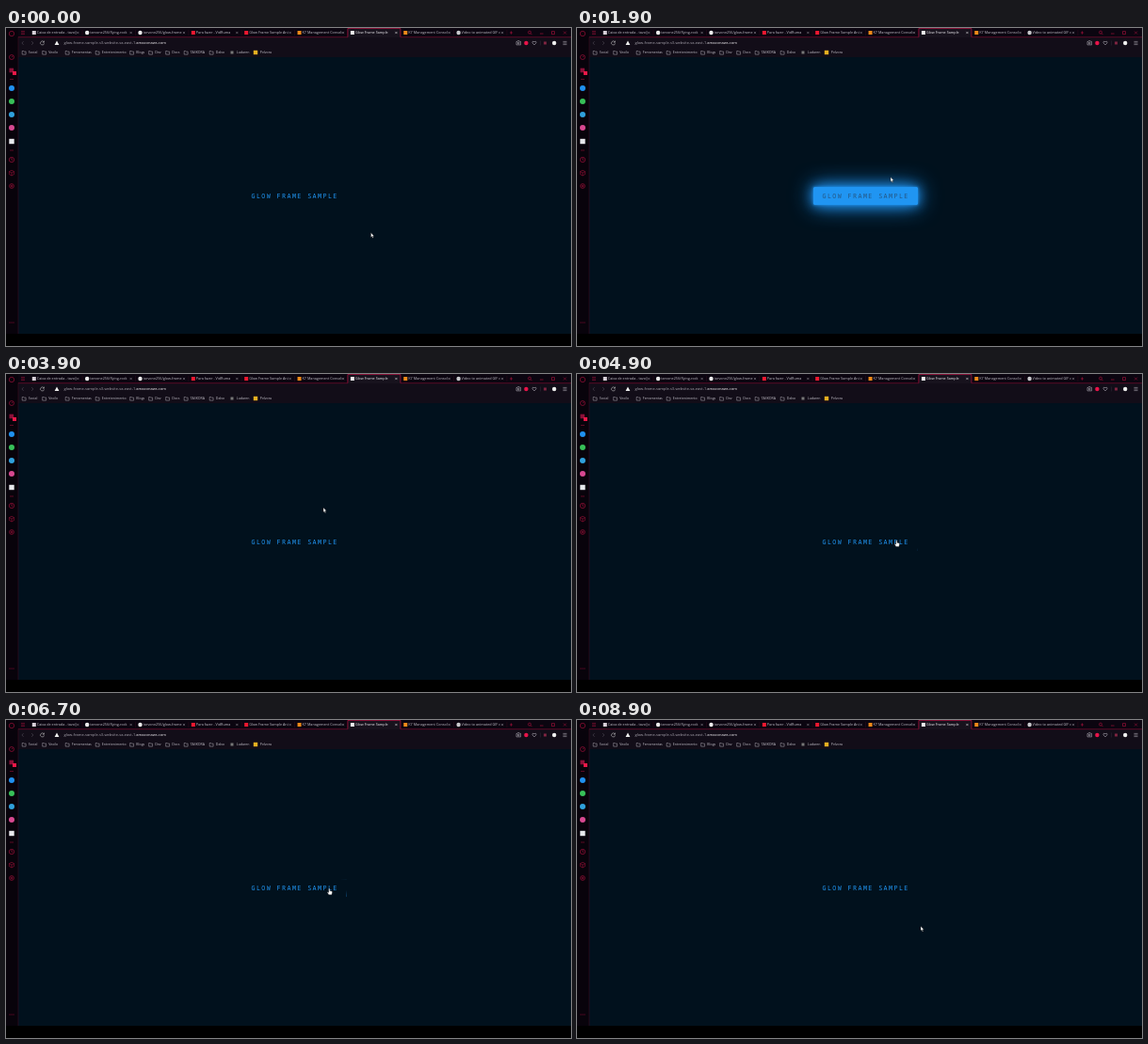
An HTML page that plays this animation: 600 by 338 pixels, repeating every 9100 ms.

```html
<!DOCTYPE html>
<html lang="pt">
<head>
<meta charset="utf-8">
<title>Glow Frame Sample</title>
<style>
  html, body { margin: 0; width: 100%; height: 100%; overflow: hidden; background: #000; }
  svg { position: absolute; left: 0; top: 0; }
  svg svg { overflow: hidden; }
  text { font-family: "Open Sans", "Noto Sans", sans-serif; white-space: pre; }
  #button {
    position: absolute; left: 250.7px; top: 169px; width: 111.2px; height: 19.2px;
    box-sizing: border-box; padding-left: 9.8px; overflow: hidden; border-radius: 1px;
    font: 6.8px/19.6px "Noto Sans Mono", monospace; letter-spacing: 1.35px; white-space: pre;
  }
  #button i { position: absolute; }
  .flat { width: 100%; height: .7px; }
  .tall { width: .7px; height: 100%; }
</style>
</head>
<body>
<svg id="browser" width="600" height="338"></svg>
<div id="button">GLOW FRAME SAMPLE<i class="flat"></i><i class="tall"></i><i class="flat"></i><i class="tall"></i></div>
<svg width="600" height="338">
  <g id="cursor" stroke="#111" stroke-width=".35" fill="#fff">
    <path id="arrow" d="M0 0V4.9L1.1 3.9L1.9 5.7L2.7 5.3L1.9 3.6H3.4Z"/>
    <path id="hand" d="M-.6 .5Q0-.4 .6 .5V2.5L2.7 3Q3.4 3.2 3.2 4.2L2.6 6.8H-.5L-2 4.5Q-2.1 3.6-1.3 3.8L-.6 4.4Z"/>
  </g>
</svg>
<script>
const $ = id => document.getElementById(id);
const RED = '#b0123f', PALE = '#c4c1ca', BLUE = '#2196f3';

// ---- browser window ----
const rect = (x, y, w, h, fill) => `<rect x="${x}" y="${y}" width="${w}" height="${h}" fill="${fill}"/>`;
const dot = (x, y, r, fill) => `<circle cx="${x}" cy="${y}" r="${r}" fill="${fill}"/>`;
const box = (x, y, size, fill) => rect(x - size / 2, y - size / 2, size, size, fill);
const line = (d, color = RED, width = .6) =>
  `<path d="${d}" fill="none" stroke="${color}" stroke-width="${width}"/>`;
const ring = (x, y, r, color = RED) =>
  `<circle cx="${x}" cy="${y}" r="${r}" fill="none" stroke="${color}" stroke-width=".6"/>`;
const label = (x, y, size, words, fill = PALE) =>
  `<text x="${x}" y="${y}" font-size="${size}" fill="${fill}">${words}</text>`;
const cross = (x, y, r, color) =>
  line(`M${x - r} ${y - r}l${2 * r} ${2 * r}m0 ${-2 * r}l${-2 * r} ${2 * r}`, color, .5);
const bars = (x, y, color) => line(`M${x - 2} ${y - 1.6}h4m-4 1.6h4m-4 1.6h4`, color, .5);

function tabs() {
  const items = [
    [box, '#d8d0d8', 'Caixa de entrada - tavo@'],
    [dot, '#eee', 'tarvone256/flying-rock'],
    [dot, '#eee', 'tarvone256/glow-frame'],
    [box, '#f01830', 'Para fazer - VidRuma'],
    [box, '#f01830', 'Glow Frame Sample Ani'],
    [box, '#f08a18', 'K7 Management Console'],
    [box, '#eee', 'Glow Frame Sample'],
    [box, '#f08a18', 'K7 Management Console'],
    [dot, '#c8c8cc', 'Video to animated GIF c']];
  return items.map(([shape, color, title], i) => {
    const x = 24.8 + i * 56.35, active = i == 6;
    return (active ? rect(x, .5, 56, 9.5, '#17121d') + line(`M${x} 9.6V.5h56V9.6`, '#d0164a') 
                   : line(`M${x + 56.3} 2V8`, '#3a1023', .4)) +
      shape(x + 5, 5, shape == box ? 4 : 2.2, color) +
      `<svg x="${x + 8}" y="0" width="42" height="10">${label(0, 6.3, 3.75, title, active ? '#f2f0f4' : PALE)}</svg>` +
      cross(x + 51.5, 5, 1.1, active ? '#eee' : '#98939d');
  }).join('');
}

function bookmarks() {
  const items = [[19, 'Social'], [40.5, 'Vexilo'], [65, 'Ferramentas'], [97, 'Entretenimento'],
    [133.5, 'Blogs'], [153.5, 'Dev'], [171.5, 'Docs'], [191, 'TASKORA'], [218, 'Dalvo'],
    [240, 'Ludaren'], [265, 'Pelvora']];
  return items.map(([x, name], i) =>
    (i < 9 ? line(`M${x - 1.8} 24.5h1.5l.6.6h1.8v3h-3.9z`, PALE, .45)
           : box(x, 26, i == 9 ? 3 : 4.4, i == 9 ? '#777' : '#e8b020')) +
    label(x + 4.8, 27.3, 3.55, name)).join('');
}

function sidebar() {
  const apps = [[64, '#2090f0'], [78, '#38c058'], [92, '#30a0dc'], [106, '#d84890']];
  return rect(0, 0, 12.7, 325, '#08030b') + ring(6, 6, 2.7) +
    ring(6, 31, 2.5) + line('M6 31l1.5-1.5') +
    box(5.8, 45, 4.6, '#8c1038') + box(9, 48, 4, '#f01848') +
    line('M4 54.5h4M4 130h4', RED, .5) +
    apps.map(([y, color]) => dot(6, y, 3, color)).join('') + box(6, 120.5, 5.4, '#e8e8ec') +
    ring(6, 140, 2.7) + line('M6 138v2l1.2.8') +
    line('M6 151.2l2.6 1.4v2.9L6 157l-2.6-1.5v-2.9zM3.4 152.6L6 154l2.6-1.4M6 154v3', RED, .5) +
    ring(6, 168, 2.4) + ring(6, 168, .9) +
    [4, 6, 8].map(x => dot(x, 313, .5, RED)).join('');
}

$('browser').innerHTML =
  rect(0, 0, 600, 10, '#0b0510') + rect(12, 10, 588, 21.5, '#120d18') +
  rect(12, 31, 588, 294, '#01111d') +
  line('M12.7 325V9.7H363M419 9.7H600', '#74102f', .7) +
  sidebar() + bars(18, 5, RED) + tabs() +
  line('M536.5 3.4v3.2m-1.6-1.6h3.2') +
  ring(556, 4.6, 1.5) + line('M557.1 5.7l1.4 1.4M567 6h3.6M579.5 3.6h3v3h-3z') + cross(593.5, 5, 1.5, RED) +
  line('M18.6 14.2L16.9 16l1.7 1.8M27.2 14.2L28.9 16l-1.7 1.8', '#55505c') +
  line('M40 14.6A2 2 0 1 0 40.5 16.4M40.5 13.6v1.6h-1.6', '#ddd', .5) +
  '<path d="M54 13.6l2.4 4.4h-4.8z" fill="#eee"/>' +
  label(61.5, 17.4, 4.05, 'glow-frame-sample.s3-website-sa-east-1.<tspan fill="#f4f2f6">amazonaws.com</tspan>', '#aaa6b0') +
  line('M542 14.4h1l.5-.8h1.6l.5.8h1v3.5H542z', PALE, .5) + ring(544.3, 16, .9, PALE) +
  dot(552.4, 16, 2.2, '#e8144a') +
  line('M561 18l-2-2.1q-.4-1.7 1-1.8l1 .8 1-.8q1.4.1 1 1.8z', PALE, .5) +
  line('M567.5 13.5v5', '#3a3342', .4) + box(572.5, 16, 3, '#7c2440') +
  dot(582.2, 16, 2.2, '#eee') + bars(593.5, 16, PALE) + bookmarks();

// ---- motion ----
const LOOP = 9100, STEP = 100;
const hovers = [[715, 2370], [2850, 3520], [3980, 5600], [5930, 7330]];
// time, x, y of the pointer tip
const track = [
  [0, 387.5, 217.6], [200, 403, 213], [600, 403, 213], [800, 352, 183], [1500, 314, 175],
  [1700, 320, 175], [2100, 346, 142], [2300, 346, 142], [2500, 345, 135], [2700, 346, 150],
  [2900, 342, 175], [3300, 328, 177], [3500, 332, 158], [3700, 335, 128], [3800, 335, 128],
  [3900, 337, 142], [4000, 335, 172], [4700, 338, 177], [5300, 342, 176], [5400, 342, 176],
  [5600, 347.3, 156.5], [5800, 348, 158], [5950, 346, 174], [6700, 343.3, 179], [7200, 345, 181],
  [7400, 350, 270], [7600, 354, 320], [7700, 355, 345], [8100, 355, 345], [8200, 360, 289],
  [8900, 365, 219.2], [LOOP, 365, 219.2]];

// CSS "ease": cubic-bezier(.25, .1, .25, 1)
function ease(p) {
  if (p <= 0) return 0;
  if (p >= 1) return 1;
  const curve = (a, b, s) => 3 * a * s * (1 - s) ** 2 + 3 * b * s * s * (1 - s) + s ** 3;
  let low = 0, high = 1;
  for (let i = 0; i < 20; i++) {
    const mid = (low + high) / 2;
    if (curve(.25, .25, mid) < p) low = mid; else high = mid;
  }
  return curve(.1, 1, low);
}

const mix = (a, b, k) => a + (b - a) * k;
const button = $('button'), sides = ['left', 'top', 'right', 'bottom'];
const edges = [...button.querySelectorAll('i')];
edges.forEach((edge, i) => {
  edge.style[sides[(i + 1) % 4 ^ (i % 2 ? 0 : 0)]] = 0;
  edge.style[['top', 'right', 'bottom', 'left'][i]] = 0;
  edge.style.background = `linear-gradient(${90 * (i + 1)}deg, transparent, ${BLUE})`;
});

function drawButton(t) {
  const lit = Math.max(...hovers.map(([on, off]) =>
    Math.min(ease((t - on - 1000) / 200), 1 - ease((t - off) / 200))));
  const start = (hovers.find(([on, off]) => t >= on && t < off) || [Infinity])[0];
  const glow = `rgba(33,150,243,${lit})`;
  button.style.background = glow;
  button.style.boxShadow = [3, 12.5, 25].map(blur => `0 0 ${blur * lit}px ${glow}`).join();
  button.style.color = `rgb(${mix(33, 37, lit)},${mix(150, 87, lit)},${mix(243, 132, lit)})`;
  edges.forEach((edge, i) => {
    edge.style[sides[i]] = mix(-100, 100, ease((t - start - 250 * i) / 1000)) + '%';
  });
}

function drawCursor(t) {
  const next = track.findIndex(key => key[0] > t);
  const [t0, x0, y0] = track[next - 1], [t1, x1, y1] = track[next];
  const k = (t - t0) / (t1 - t0), x = mix(x0, x1, k), y = mix(y0, y1, k);
  const over = x > 250 && x < 362 && y > 169 && y < 188;
  $('cursor').setAttribute('transform', `translate(${x} ${y})`);
  $('hand').style.display = over ? '' : 'none';
  $('arrow').style.display = over ? 'none' : '';
}

function frame() {
  const t = Math.floor(performance.now() % LOOP / STEP) * STEP;
  drawButton(t);
  drawCursor(t);
  requestAnimationFrame(frame);
}
frame();
</script>
</body>
</html>
```
